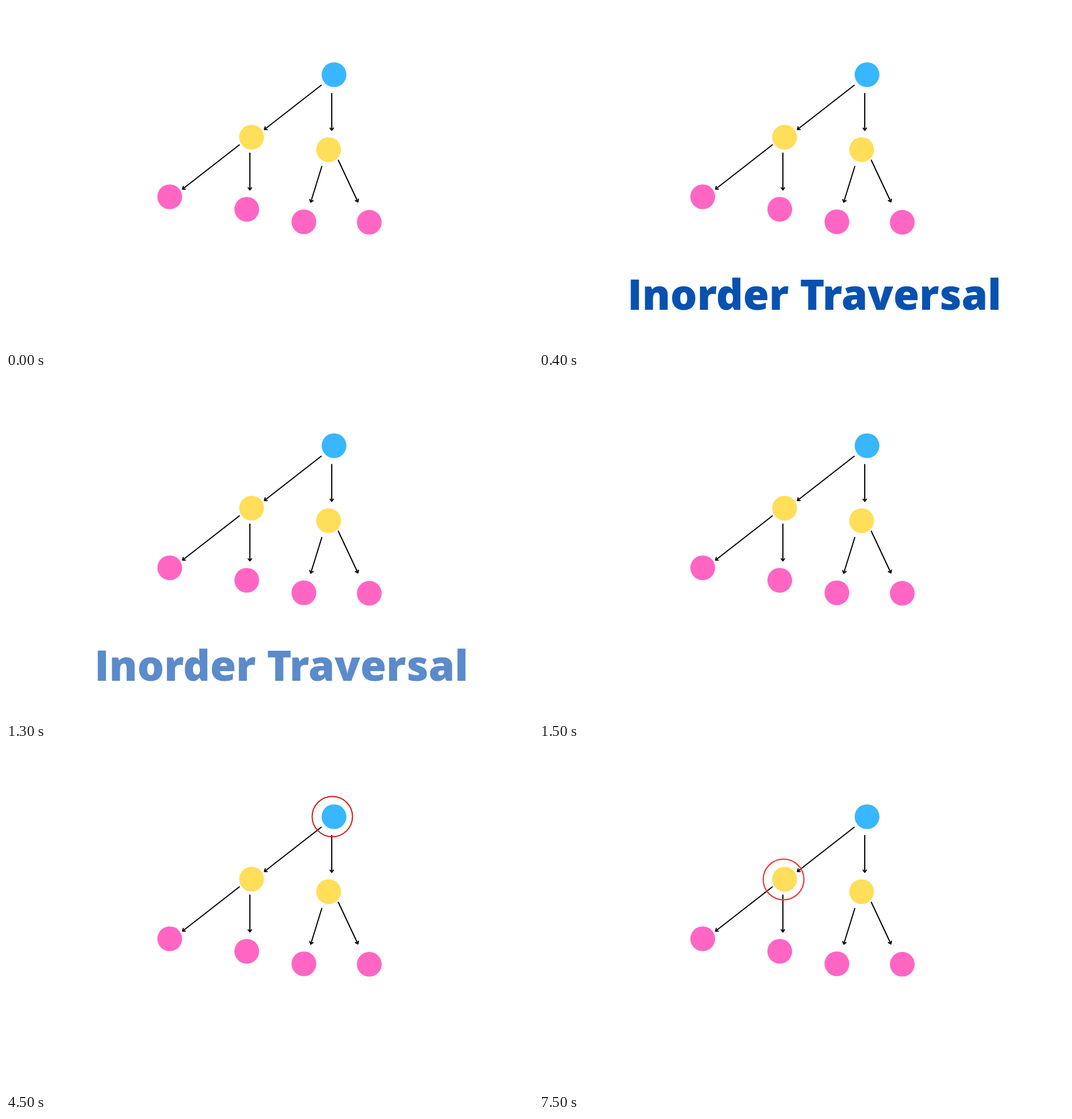
These frames come from a looping animation (927 by 604 pixels, 8000 ms). An HTML page:

```html
<!DOCTYPE html>
<html lang="en">
<head>
<meta charset="utf-8">
<title>Tree traversal</title>
<style>
  html, body { margin: 0; width: 100%; height: 100%; overflow: hidden; background: #fff; }
  svg { display: block; width: 927px; height: 604px; }
  text { font: 800 74px "Open Sans", sans-serif; fill: #004aad; text-anchor: middle; }
  #arrows { fill: none; stroke: #000; stroke-width: 2; stroke-linecap: round; stroke-linejoin: round; }
  .ring { fill: none; }
</style>
</head>
<body>
<svg viewBox="0 0 927 604">
  <g id="arrows"></g>
  <g id="nodes"></g>
  <circle class="ring" id="rootRing" cx="574" cy="120.8" r="35.5" stroke="#d41414" stroke-width="2"/>
  <circle class="ring" id="leftRing" cx="430.2" cy="231.5" r="35.8" stroke="#e8413f" stroke-width="2.3"/>
  <text id="title" x="484.5" y="535">Inorder Traversal</text>
</svg>
<script>
const LOOP = 8000, STEP = 100, FADE = 500;
const byId = id => document.getElementById(id);

const nodes = [
  [577, 121, '#38b6ff'],
  [432, 231, '#ffde59'], [567.5, 253, '#ffde59'],
  [288, 336, '#ff66c4'], [423.5, 358, '#ff66c4'],
  [524, 380, '#ff66c4'], [639, 380.8, '#ff66c4']
];
const arrows = [
  [554.5, 139.5, 454.5, 217.5], [573, 154, 573, 219],
  [410.5, 244.5, 310.5, 322.5], [429, 259, 429, 324],
  [555.5, 282.5, 536, 345.5], [584.5, 271.5, 619, 345]
];

byId('nodes').innerHTML = nodes.map(([x, y, fill]) =>
  `<circle cx="${x}" cy="${y}" r="21.8" fill="${fill}"/>`).join('');

byId('arrows').innerHTML = arrows.map(([x1, y1, x2, y2]) => {
  const angle = Math.atan2(y2 - y1, x2 - x1) * 180 / Math.PI;
  const length = Math.hypot(x2 - x1, y2 - y1);
  return `<path transform="translate(${x2} ${y2}) rotate(${angle})" d="M${-length} 0H0M-4 -3L0 0L-4 3"/>`;
}).join('');

// Each part eases in and, if it has an end, eases out again.
const parts = [
  { el: byId('title'), start: 0, end: 1000 },
  { el: byId('rootRing'), start: 1500, end: 5600 },
  { el: byId('leftRing'), start: 6000, end: Infinity }
];
const progress = t => Math.min(1, Math.max(0, t / FADE));
const opacity = (t, start, end) =>
  t < end ? 1 - (1 - progress(t - start)) ** 2 : 1 - progress(t - end) ** 2;

const origin = performance.now();
function draw() {
  const elapsed = (performance.now() - origin) % LOOP;
  const t = Math.floor(elapsed / STEP) * STEP;
  for (const { el, start, end } of parts) el.setAttribute('opacity', opacity(t, start, end));
  requestAnimationFrame(draw);
}
draw();
</script>
</body>
</html>
```
